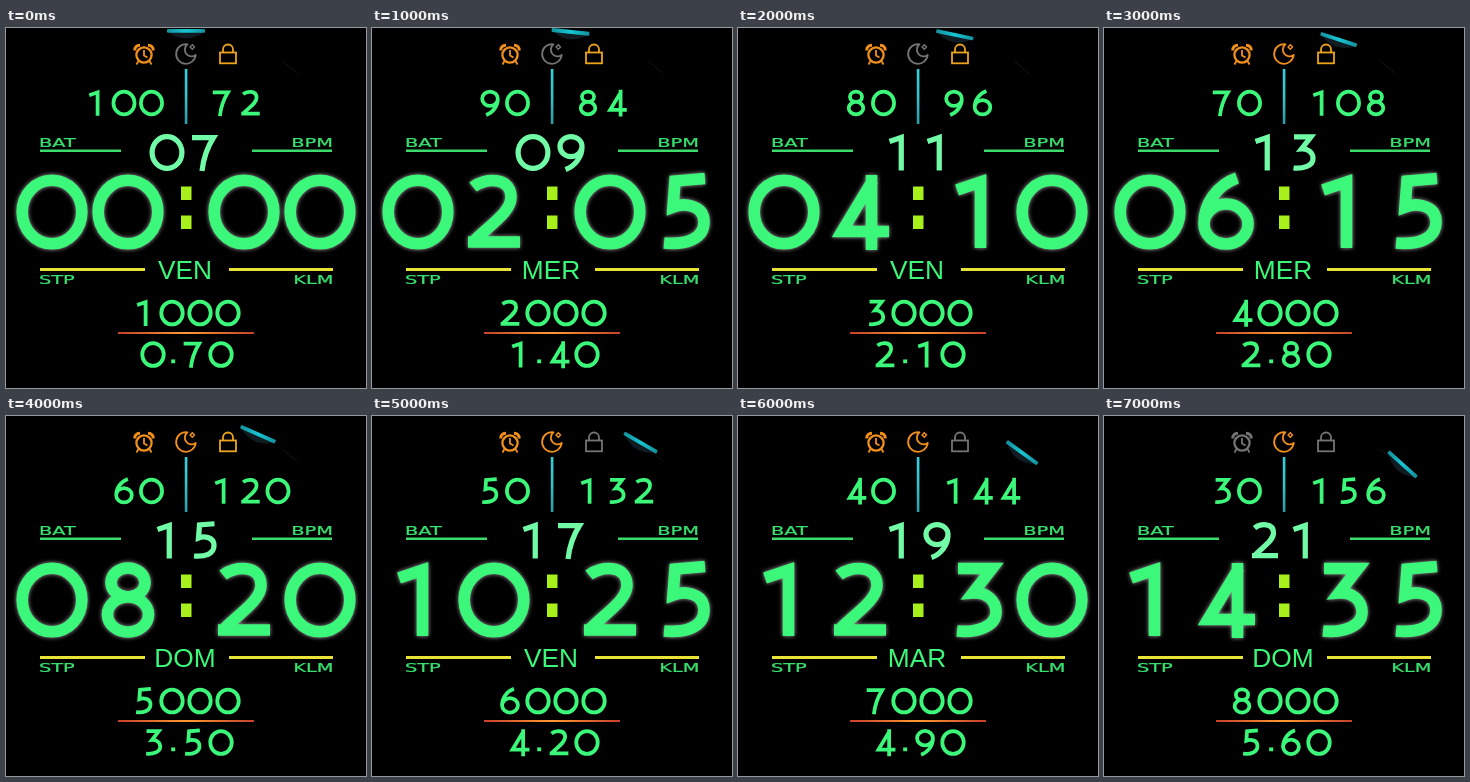
Animation of 360x360 px, one loop 8000 ms. Source, as an HTML page:

```html
<!DOCTYPE html>
<html lang="it">
<head>
<meta charset="utf-8">
<title>Watch face</title>
<style>
  html, body { margin: 0; width: 100%; height: 100%; overflow: hidden; background: #000; }
  svg { display: block; width: 100vw; height: 100vh; }
  .digits { fill: none; stroke: #3cf87a; stroke-width: 10.5; stroke-miterlimit: 4; }
  #date { stroke: #72fba6; }
  #clock { stroke-width: 11.6; filter: drop-shadow(0 0 2px #a0a0a0); }
  .label { font: 12.5px "DejaVu Sans", sans-serif; fill: #38e070; stroke: #38e070; stroke-width: .25; }
  #day { font: 26.3px "Liberation Sans", Arial, sans-serif; fill: #3cf87a; text-anchor: middle; }
  .icon { fill: none; stroke: #747474; stroke-width: 1.8; }
  .icon.on { stroke: #f2901c; }
  #lock.on { stroke: #eba41c; }
</style>
</head>
<body>
<svg viewBox="0 0 360 360">
  <defs>
    <linearGradient id="beam" gradientUnits="userSpaceOnUse" x1="0" y1="41" x2="0" y2="96">
      <stop offset="0" stop-color="#2ed3df"/><stop offset=".5" stop-color="#35c3cb"/><stop offset="1" stop-color="#2a9da8"/>
    </linearGradient>
    <linearGradient id="ember">
      <stop offset="0" stop-color="#c8402a"/><stop offset=".5" stop-color="#ff9a30"/><stop offset="1" stop-color="#c8402a"/>
    </linearGradient>
    <linearGradient id="tip">
      <stop offset="0" stop-color="#14909c"/><stop offset=".5" stop-color="#16c6d4"/><stop offset="1" stop-color="#14909c"/>
    </linearGradient>
  </defs>
  <rect width="360" height="360"/>
  <path d="M276 33L291 45" stroke="#151515" fill="none"/>

  <g id="hand">
    <path d="M162 4Q180 17 198 4Z" fill="#101c22"/>
    <rect x="161" y="1" width="38" height="3.8" rx="1" fill="url(#tip)"/>
  </g>

  <g id="alarm" class="icon">
    <circle cx="138" cy="27" r="7.6" stroke-width="2.3"/>
    <path d="M138 22V27.5L141.5 29.5M132.5 33L130.5 36.5M143.5 33L145.5 36.5"/>
    <path d="M128.8 22.5Q128.5 17.5 134 17.3M147.2 22.5Q147.5 17.5 142 17.3" stroke-width="3"/>
  </g>
  <g id="moon" class="icon">
    <path d="M181.5 16.3A9.8 9.8 0 1 0 189.7 27A6.7 6.7 0 0 1 181.5 16.3Z" stroke-linejoin="round"/>
    <path d="M186.3 16.8L188.5 19L186.3 21.2L184.1 19Z" stroke-width="1.4"/>
  </g>
  <g id="lock" class="icon">
    <rect x="214" y="24.5" width="16" height="10.8"/>
    <path d="M217 24V21.5A5 5 0 0 1 227 21.5V24"/>
  </g>

  <rect x="178.8" y="41" width="2.6" height="55" fill="url(#beam)"/>
  <path d="M34 122.8H115M246 122.8H326" stroke="#3bdc6c" stroke-width="2.4"/>
  <path d="M34 241.5H139M223 241.5H327" stroke="#e9e336" stroke-width="3"/>
  <rect x="112" y="304" width="136" height="2" fill="url(#ember)"/>
  <path d="M175 158.5h10.5v13.5h-10.5zM175 187.5h10.5v13.5h-10.5z" fill="#a8f01c"/>

  <g class="label">
    <text transform="translate(33 119) scale(1.55 1)">BAT</text>
    <text transform="translate(327 119) scale(1.55 1)" text-anchor="end">BPM</text>
    <text transform="translate(33 256) scale(1.55 1)">STP</text>
    <text transform="translate(327.5 256) scale(1.55 1)" text-anchor="end">KLM</text>
  </g>
  <text id="day" x="179" y="251"></text>

  <g id="bat" class="digits"></g>
  <g id="bpm" class="digits"></g>
  <g id="date" class="digits"></g>
  <g id="clock" class="digits"></g>
  <g id="steps" class="digits"></g>
  <g id="dist" class="digits"></g>
</svg>
<script>
const $ = id => document.getElementById(id);

const oval = (y, rx, ry) =>
  `M${-rx} ${y}a${rx} ${ry} 0 1 1 ${2 * rx} 0a${rx} ${ry} 0 1 1 ${-2 * rx} 0Z`;

// Numeral strokes around the centre of a 72 x 76 cell.
const glyphs = {
  0: oval(0, 29.8, 31.8),
  1: 'M-19-22L4.5-30V36',
  2: 'M-21-25C-10-34 17-36 17-15C17 0-3 12-19 28M-26 30H26',
  3: 'M-18-31.5H16L-3-7C10-8 20 0 20 12C20 27 0 33-19 31',
  4: 'M29 19.5H-18L13-32M11.5-37V38',
  5: 'M19-33.5L-11-31L-13-5C-3-9 18-8 18 10C18 27 0 33-22 31',
  6: 'M11-34C-9-27-22-8-22 11' + oval(12, 22, 20),
  7: 'M-26-30H17Q-2 0-6 37',
  8: oval(-17.5, 17, 14.5) + oval(14.5, 20.5, 17.5),
  9: 'M-11 34C9 27 22 8 22-11' + oval(-12, 22, 20),
  '.': 'M-5 19H6'
};

// Draws one numeral per centre x.
function put(id, text, xs, y, scale) {
  $(id).innerHTML = [...text].map((c, i) =>
    `<path transform="translate(${xs[i]} ${y}) scale(${scale})" d="${glyphs[c]}"/>`).join('');
}

const two = n => String(n).padStart(2, '0');
const days = ['DOM', 'LUN', 'MAR', 'MER', 'GIO', 'VEN', 'SAB'];

function draw(n) {
  const date = 7 + 2 * n;
  const bat = String(100 - 10 * n);
  put('bat', bat, [90, 118, 145.5].slice(-bat.length), 75, .355);
  put('bpm', String(72 + 12 * n), [216, 244.5, 272], 75, .355);
  put('date', two(date), [161, 199], 124.5, .5);
  put('clock', two(2 * n) + two(5 * n), [46, 122, 238, 314], 184, 1);
  put('steps', String(1000 * (n + 1)), [138, 166, 194, 222], 285, .36);
  put('dist', (.7 * (n + 1)).toFixed(2), [147, 167, 187, 215], 326.5, .36);
  // Month and date advance together.
  $('day').textContent = days[new Date(2022, n, date).getDay()];
  $('hand').setAttribute('transform', `rotate(${6 * n} 180 180)`);
  $('alarm').classList.toggle('on', n < 7);
  $('moon').classList.toggle('on', n >= 3);
  $('lock').classList.toggle('on', n < 5);
}

const start = performance.now();
let shown = -1;
function tick() {
  const n = Math.floor((performance.now() - start) / 1000) % 8;
  if (n !== shown) draw(shown = n);
  requestAnimationFrame(tick);
}
tick();
</script>
</body>
</html>
```
